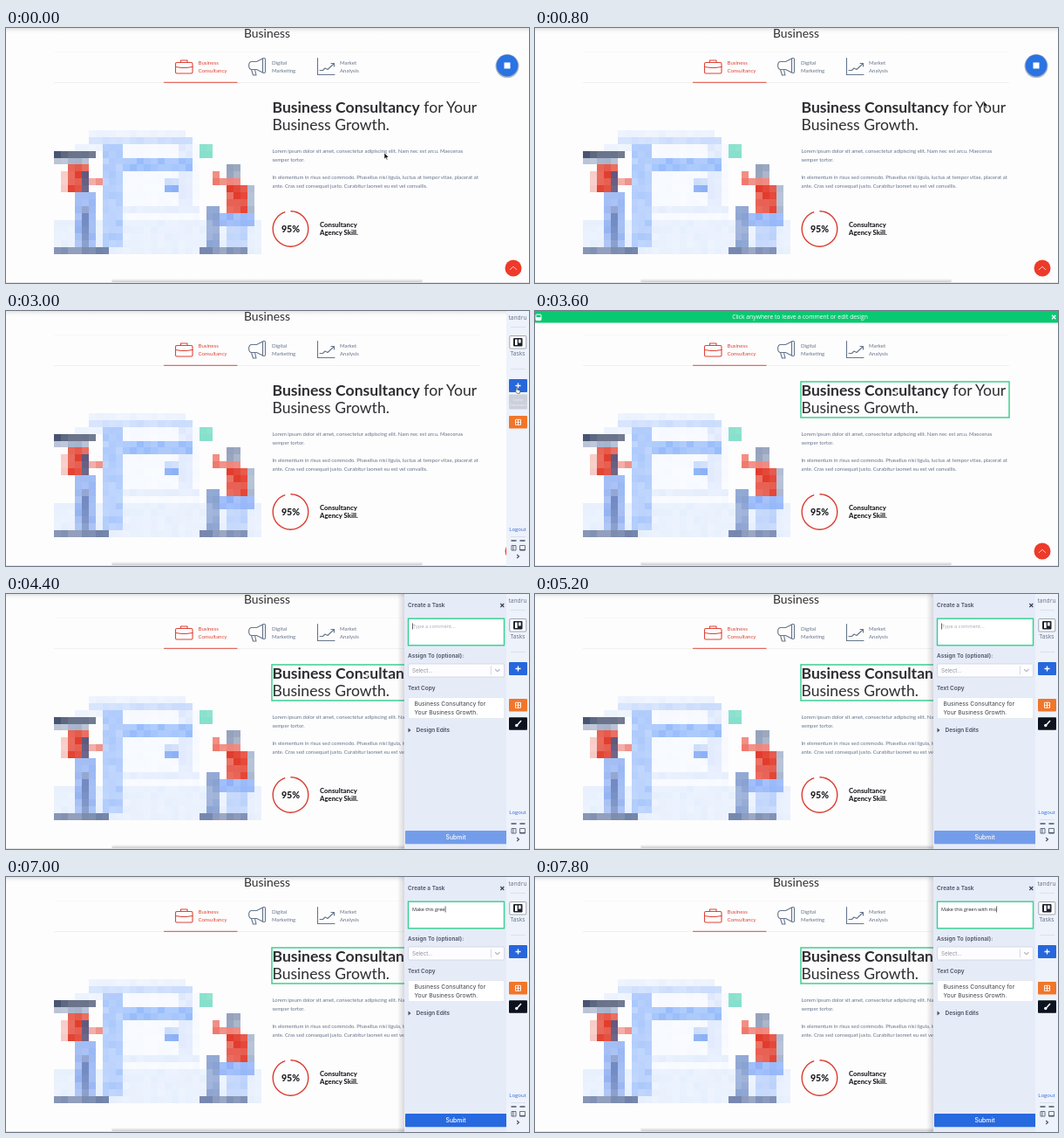
Recreate the animation shown at these times as an HTML page. Size 600 by 292 pixels, loop 8 s.

```html
<!DOCTYPE html>
<html lang="en">
<head>
<meta charset="utf-8">
<title>Comment on a page</title>
<style>
  html, body { margin: 0; width: 100%; height: 100%; overflow: hidden; background: #fdfdfd; }
  svg { display: block; width: 100%; height: 100%; }
  text { white-space: pre; }
  .site { font-family: Lato, sans-serif; }
  .app { font-family: Inter, sans-serif; }
  .open { font-family: "Open Sans", sans-serif; }
  .mid { text-anchor: middle; }
  .line { fill: none; stroke-linecap: round; stroke-linejoin: round; }
</style>
</head>
<body>
<svg id="stage" viewBox="0 0 600 292">
  <defs>
    <linearGradient id="topShade" x2="0" y2="1">
      <stop offset="0" stop-color="#e2e2e2"/><stop offset="1" stop-color="#fdfdfd" stop-opacity="0"/>
    </linearGradient>
    <linearGradient id="edge">
      <stop offset="0" stop-color="#556" stop-opacity="0"/><stop offset="1" stop-color="#556" stop-opacity=".22"/>
    </linearGradient>
    <linearGradient id="bottomShade" x2="0" y2="1">
      <stop offset="0" stop-color="#ccc" stop-opacity="0"/><stop offset="1" stop-color="#ccc"/>
    </linearGradient>
  </defs>

  <g id="page" class="site">
    <rect width="600" height="292" fill="#fdfdfd"/>
    <rect width="600" height="7" fill="url(#topShade)"/>
    <rect x="121" y="287" width="357" height="4" rx="2" fill="url(#bottomShade)"/>
    <rect y="291" width="600" height="1" fill="#e2e2e2"/>
    <text class="mid" x="299.500" y="10.800" font-size="13.900" fill="#2f2f33">Business</text>
    <path d="M55 27.500H544" stroke="#f8f8f8"/>
    <path d="M55 62.500H544" stroke="#f0f0f1"/>
    <path d="M181 62.300H265.500" stroke="#e2473b"/>

    <g class="line" stroke="#de4438" stroke-width="1.100">
      <rect x="194.500" y="39.500" width="19.500" height="12.500" rx="1.500"/>
      <path d="M200.500 39.500v-2.500h7.500v2.500M194.500 44.500l7 1h5.500l7-1"/>
    </g>
    <g class="line" stroke="#66758c" stroke-width="1.100">
      <path d="M282 38.500h5.500l7-3.500V51l-7-3.500H282c-4.500 0-4.500-9 0-9zM281.500 47.500l2 6.500h3.500l-1.500-6.500"/>
      <rect x="294.500" y="34.500" width="3" height="17" rx="1.200"/>
      <path d="M357.500 34.500V53.500H377M360 48.500h3.500l2.500-2.500 3 1.500 7-6.500M373 40.500h3.500v3.500"/>
    </g>
    <g id="tabs" font-size="6.100"></g>

    <g font-size="17.600" fill="#2e2e32">
      <text x="305.500" y="97"><tspan font-weight="700">Business Consultancy</tspan> for Your</text>
      <text x="305.500" y="117">Business Growth.</text>
    </g>
    <g id="copy" font-size="5.960" fill="#66748c"></g>

    <circle cx="326.500" cy="230" r="20.300" fill="none" stroke="#da3b30" stroke-width="1.400"
      pathLength="100" stroke-dasharray="95 5" transform="rotate(-90 326.500 230)"/>
    <text class="mid" x="326.500" y="233.700" font-size="10.700" font-weight="800" fill="#1c1c22">95%</text>
    <g font-size="7.750" font-weight="800" fill="#1c1c22">
      <text x="360" y="228">Consultancy</text><text x="360" y="236.800">Agency Skill.</text>
    </g>

    <g id="mosaic" shape-rendering="crispEdges"></g>

    <circle cx="582" cy="275" r="9.500" fill="#ee3a2a"/>
    <path class="line" d="M578.200 276.700l3.800-3.500 3.800 3.500" stroke="#fff" stroke-width=".7"/>
    <rect id="pick" x="305" y="81" width="239" height="41" fill="none" stroke="#3fcf92" stroke-width="1.500"/>
  </g>

  <g id="launcher">
    <circle cx="575" cy="43.600" r="13.500" fill="#5f6c8a" opacity=".5"/>
    <circle id="knob" cx="575" cy="43" r="12.400"/>
    <rect x="571.500" y="39.500" width="7" height="7" fill="#fff"/>
  </g>

  <g id="bar">
    <rect width="600" height="13.500" fill="#08c971"/>
    <text class="open mid" x="304" y="9.300" font-size="6.750" fill="#fff">Click anywhere to leave a comment or edit design</text>
    <rect x="1" y="4" width="6" height="6.500" rx="1" fill="none" stroke="#fff"/>
    <rect x="1" y="7" width="6" height="3.500" fill="#fff"/>
    <path d="M593 4.800l4.400 4.400m0-4.400l-4.400 4.400" stroke="#fff" stroke-width="1.300"/>
  </g>

  <g id="panel" class="app" fill="#4a5163">
    <rect x="449" width="8" height="292" fill="url(#edge)"/>
    <rect x="457" width="118" height="292" fill="#e6ebf8"/>
    <g font-size="6.450" font-weight="600">
      <text x="461" y="15.300">Create a Task</text>
      <text x="461" y="73">Assign To (optional):</text>
      <text x="461" y="110">Text Copy</text>
      <text x="470.500" y="158.300">Design Edits</text>
    </g>
    <path d="M567.300 11l4 4m0-4l-4 4" stroke="#3b4152" stroke-width="1.200"/>
    <rect x="461.500" y="28.200" width="110" height="30.600" fill="#fff" stroke="#35cf8e" stroke-width="1.400"/>
    <text id="hint" class="open" x="467" y="39" font-size="5.700" fill="#a3a8b3">Type a comment...</text>
    <text id="typed" class="open" x="466" y="39" font-size="5.500" fill="#22252c"></text>
    <rect id="caret" y="33.500" width=".7" height="7" fill="#222"/>
    <rect x="461.500" y="80" width="110" height="15" rx="1.500" fill="#fdfdff" stroke="#cdd2dd" stroke-width=".8"/>
    <text x="466" y="89.800" font-size="6.200" fill="#8b909b">Select...</text>
    <path d="M556.500 82.500v10" stroke="#cdd2dd" stroke-width=".8"/>
    <path class="line" d="M561.500 86.500l2.300 2.200 2.300-2.200" stroke="#b5bac5" stroke-width="1.200"/>
    <rect x="461.500" y="118.500" width="110" height="24" rx="1.500" fill="#fff" stroke="#dde1ea" stroke-width=".6"/>
    <g font-size="6.800" fill="#3d424e">
      <text x="468.500" y="128.200">Business Consultancy for</text><text x="468.500" y="137.600">Your Business Growth.</text>
    </g>
    <path d="M461.500 153.500v5l3-2.500z"/>
    <rect id="submit" x="458" y="271" width="117" height="15.300" rx="1"/>
    <text class="mid" x="516" y="281.200" font-size="6.900" font-weight="500" fill="#fff">Submit</text>
  </g>

  <g id="side" class="open">
    <rect x="574" width="26" height="292" fill="#edf2fb"/>
    <path d="M579 18.500h17M579 66.500h17M579 258.500h17" stroke="#d3dbe8" stroke-width=".7"/>
    <g class="mid" font-size="6.700" fill="#667084">
      <text x="587" y="10">tandru</text><text x="587" y="51">Tasks</text>
      <text x="587" y="252" font-size="6" fill="#2f66d4">Logout</text>
    </g>
    <rect x="577.800" y="28.500" width="19" height="14.500" rx="1" fill="#fff" stroke="#7a8191" stroke-width=".7"/>
    <rect x="582" y="31" width="10.500" height="9.500" rx="1" fill="#1d222c"/>
    <path d="M584 32.500h2.700v6.500H584zM588 32.500h2.700v4H588z" fill="#fff"/>
    <rect x="577" y="78" width="21" height="15" rx="1" fill="#2767db"/>
    <path d="M587.500 82.500v6M584.500 85.500h6" stroke="#fff" stroke-width="1.300"/>
    <g id="tip" class="mid" font-size="4.200" fill="#f1f3f8">
      <rect x="577" y="95.500" width="21" height="17" rx="1" fill="#cbd0da"/>
      <text x="587.500" y="103">Leave</text><text x="587.500" y="108.500">Comment</text>
    </g>
    <rect x="577" y="120" width="21" height="14.500" rx="1" fill="#f0762b"/>
    <path d="M584.500 124.300h6v6h-6zM587.500 124.300v6M584.500 127.300h6" fill="none" stroke="#fff" stroke-width=".9"/>
    <g id="brush">
      <rect x="577" y="141.300" width="21" height="14.500" rx="1" fill="#0d131e"/>
      <path d="M591 145l-4 4.500" stroke="#fff" stroke-width="1.500"/><circle cx="585.800" cy="150.500" r="1.700" fill="#fff"/>
    </g>
    <g fill="none" stroke="#4a5367" stroke-width=".8">
      <path d="M579.500 263h6M589.500 263h6" stroke-width="1.300"/>
      <path d="M580 268.500h5v5.500h-5zM582 268.500v5.500M589.500 268.500h6v5.500h-6z"/>
      <path d="M589.500 273.500h6" stroke-width="1.300"/>
      <path d="M586.200 279l2.200 2-2.200 2" stroke-width="1.200"/>
    </g>
  </g>

  <g id="cursor">
    <path id="arrow" d="M0 0v7l1.700-1.500 1.100 2.400 1.100-.5-1.100-2.300h2.300z" fill="#111" stroke="#fff" stroke-width=".5"/>
    <path id="hand" d="M.2 .8q.9-1.100 1.600 0v2.400l2.600 .6q.7.300.5 1.200l-.6 2.300H1.400L-.8 4.700q0-1 1-.4z" fill="#fff" stroke="#2a2f3a" stroke-width=".6"/>
    <path id="cross" d="M0-3V3M-3 0H3" stroke="#fff" stroke-width="1.600" opacity=".85"/>
  </g>
</svg>
<script>
const $ = id => document.getElementById(id);
const LOOP = 8000;
const PHRASE = 'Make this green with mo';

const label = (x, y, str, color) =>
  `<text x="${x}" y="${y}"${color ? ` fill="${color}"` : ''}>${str}</text>`;

$('tabs').innerHTML = [
  [220.5, '#de4438', 'Business', 'Consultancy'],
  [305, '#66758c', 'Digital', 'Marketing'],
  [383, '#66758c', 'Market', 'Analysis'],
].map(([x, c, a, b]) => label(x, 42, a, c) + label(x, 51, b, c)).join('');

$('copy').innerHTML = [
  [143, 'Lorem ipsum dolor sit amet, consectetur adipiscing elit. Nam nec est arcu. Maecenas'],
  [153, 'semper tortor.'],
  [173, 'In elementum in risus sed commodo. Phasellus nisi ligula, luctus at tempor vitae, placerat at'],
  [183, 'ante. Cras sed consequat justo. Curabitur laoreet eu est vel convallis.'],
].map(([y, s]) => label(305.5, y, s)).join('');

// Blocks of the mosaic in cells: colour, column, row, width, height. Later ones lie on top.
const BLOCKS = [
  ['#eaf1fe', 5, 0, 14, 1], ['#c9dbfc', 5, 1, 15, 1], ['#edf3fe', 3, 2, 4, 1],
  ['#e6effd', 0, 13, 30, 5], ['#f6f9ff', 10, 2, 11, 11], ['#dfe9fd', 18, 2, 2, 10],
  ['#a9c7fc', 7, 2, 3, 15], ['#97bcfb', 10, 4, 10, 2], ['#e4edfd', 10, 11, 11, 1],
  ['#c5d8fb', 16, 7, 2, 1], ['#86adf5', 16, 8, 2, 1],
  ['#414d6b', 0, 3, 6, 1], ['#a7b4cb', 0, 4, 5, 1], ['#86e0cb', 21, 2, 2, 2],
  ['#f6c0ba', 1, 6, 1, 3], ['#e23e2d', 2, 5, 3, 4], ['#ee8f87', 5, 7, 2, 1],
  ['#5f567c', 4, 6, 1, 3],
  ['#94b3f2', 3, 9, 3, 8], ['#6d86bf', 4, 11, 1, 6],
  ['#8f9db8', 25, 5, 2, 2], ['#ee6a5d', 23, 6, 1, 2], ['#ef7d72', 24, 7, 3, 1],
  ['#e23a2a', 25, 8, 3, 4], ['#a0afc9', 28, 8, 1, 4],
  ['#85abf8', 24, 12, 5, 2], ['#b6cefb', 25, 14, 3, 3], ['#869fd0', 22, 11, 2, 6],
  ['#6d7fa6', 0, 17, 8, 1], ['#7486ae', 21, 17, 7, 1],
];
const noise = n => { const v = Math.sin(n * 12.9898) * 43758.5453; return v - Math.floor(v); };
const COLS = 30, CELL_W = 238 / COLS, CELL_H = 142 / 18;
$('mosaic').innerHTML = BLOCKS.map(([fill, col, row, w, h]) => {
  let out = '';
  for (let r = row; r < row + h; r++) for (let c = col; c < col + w; c++) {
    const box = `x="${55 + c * CELL_W}" y="${117 + r * CELL_H}" width="${CELL_W}" height="${CELL_H}"`;
    const light = noise(r * COLS + c + 1) * 0.28;
    out += `<rect ${box} fill="${fill}"/><rect ${box} fill="#fff" opacity="${light.toFixed(2)}"/>`;
  }
  return out;
}).join('');

const clamp = v => Math.max(0, Math.min(1, v));
const ease = (t, from, to) => { const p = clamp((t - from) / (to - from)); return p * p * (3 - 2 * p); };
const show = (id, on) => $(id).setAttribute('visibility', on ? 'inherit' : 'hidden');
const shift = (id, x, y = 0) => $(id).setAttribute('transform', `translate(${x} ${y})`);

// Pointer moves: start, end, x and y reached.
const MOVES = [[300, 1200, 572, 42], [2400, 2900, 585, 87], [3200, 3550, 414, 93]];
function pointer(t) {
  let x = 434, y = 143;
  for (const [from, to, tx, ty] of MOVES) {
    const p = ease(t, from, to);
    x += (tx - x) * p;
    y += (ty - y) * p;
  }
  return [x, y];
}

function render(t) {
  const [x, y] = pointer(t);
  const picking = t >= 3200 && t < 4000;
  const opened = ease(t, 4000, 4300);
  const sideIn = t < 3200 ? ease(t, 2100, 2400) : t < 4000 ? 1 - ease(t, 3200, 3400) : opened;

  shift('cursor', x, y);
  show('cursor', t < 4800);
  show('arrow', x < 564 && t < 1500);
  show('hand', x >= 564 && t < 3200);
  show('cross', t >= 3200);

  show('launcher', t < 2200);
  $('knob').setAttribute('fill', t > 1100 ? '#225dc6' : '#2a73e2');
  show('bar', picking);
  show('pick', t >= 3200 && x < 544);

  shift('side', 26 * (1 - sideIn));
  show('side', sideIn > 0);
  show('tip', t > 2750 && t < 3200);
  show('brush', t >= 4000);
  shift('panel', 151 * (1 - opened));
  show('panel', opened > 0);

  const count = Math.max(0, Math.min(PHRASE.length, Math.floor((t - 5740) / 89)));
  const typed = $('typed');
  typed.textContent = PHRASE.slice(0, count);
  show('hint', count === 0);
  $('caret').setAttribute('x', 466.3 + (count ? typed.getComputedTextLength() : 0));
  show('caret', count > 0 || (t > 4300 && t % 1000 < 500));
  $('submit').setAttribute('fill', count ? '#2769df' : '#739dea');
}

const start = performance.now();
function tick() {
  render((performance.now() - start) % LOOP);
  requestAnimationFrame(tick);
}
render(0);
requestAnimationFrame(tick);
</script>
</body>
</html>
```
